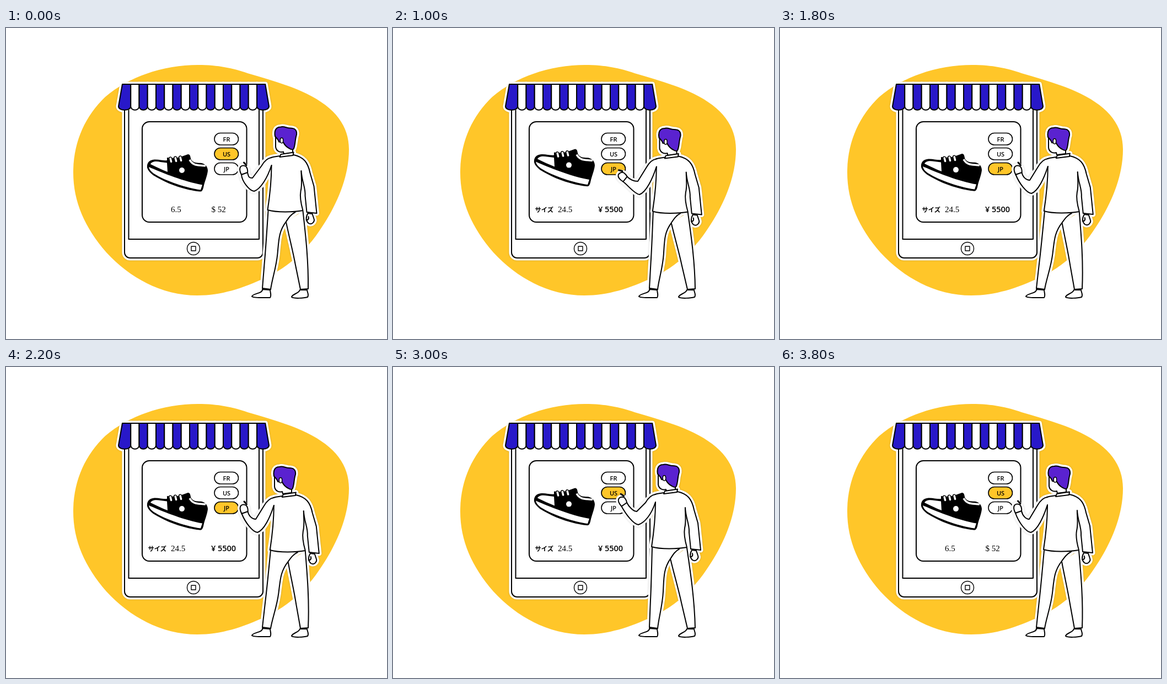
An HTML page for the animation above (4000 ms loop, 691 by 564 pixels).

```html
<!DOCTYPE html>
<html lang="en">
<head>
<meta charset="utf-8">
<title>Shoe shop</title>
<style>
  html, body { margin: 0; width: 100%; height: 100%; overflow: hidden; background: #fff; }
  svg { display: block; width: 691px; height: 564px; }
  .ink { fill: #fff; stroke: #000; stroke-width: 2; stroke-linejoin: round; stroke-linecap: round; }
  .halo { fill: #fff; stroke: #fff; stroke-width: 9; stroke-linejoin: round; stroke-linecap: round;
          filter: drop-shadow(0 0 1.5px rgba(0, 0, 0, .18)); }
  text { fill: #000; stroke: none; }
  .label { font: 600 11px "Open Sans", "Noto Sans", sans-serif; text-anchor: middle; }
  .serif { font: 15px "Liberation Serif", "Times New Roman", serif; }
  .kana { font: 700 11.3px "Noto Sans CJK JP", "Noto Sans CJK", sans-serif; }
  .yen { font: 600 14.5px "Open Sans", "Noto Sans", sans-serif; }
</style>
</head>
<body>
<svg viewBox="0 0 691 564">
  <defs>
    <path id="blob" d="M348 67C385 67 412 73 438 82C475 93 515 104 545 119C598 145 622 178 622 220C622 275 596 330 562 377C535 413 505 437 470 453C430 472 390 485 347 485C285 485 226 455 182 407C143 362 122 315 122 262C122 208 143 160 180 125C225 86 290 67 348 67Z"/>
    <clipPath id="onBlob"><use href="#blob"/></clipPath>
  </defs>
  <use href="#blob" fill="#ffc629"/>

  <g clip-path="url(#onBlob)"><g class="halo"><use href="#stall"/></g></g>
  <g class="ink">
    <g id="stall">
      <rect x="215" y="120" width="251" height="297" rx="10"/>
      <g id="awning"></g>
    </g>
    <path fill="none" d="M222.5 149V383H459V149"/>
    <g stroke-width="1.4">
      <circle cx="340" cy="400" r="11.5"/>
      <rect x="336" y="396" width="8" height="8"/>
    </g>
    <rect x="247" y="170" width="189.5" height="182" rx="13"/>
    <g id="buttons" stroke-width="1.6"></g>
    <g id="us">
      <text class="serif" x="299" y="334">6.5</text>
      <text class="serif" x="372.5" y="334">$ 52</text>
    </g>
    <g id="jp">
      <text class="kana" x="257.5" y="334">サイズ</text>
      <text class="serif" x="299" y="334">24.5</text>
      <text class="yen" x="372" y="334">¥ 5500</text>
    </g>
  </g>

  <g id="shoe" fill="#fff">
    <path d="M256 253C255 245 260 239 269 238.5C278 238 286 241 292 240L292 235C300 236 308 236 316 234L330 229C335 229 334 235 336 239C341 246 348 244 355 245C362 247 366 252 366 259C365 268 361 277 359 285C358 290 357 295 354 296.500C350 297 340 295 330 293C305 287 285 278 267 267C261 262 257 258 256 253Z" fill="#000"/>
    <path d="M262 247C264 242 272 241 280 243L292 244.500L293 261C283 257 272 252 262 247Z"/>
    <path d="M259 252C280 261 320 278 356 284.500L353 293.500C330 291 290 278 268 264C263 260 260 257 259 252Z"/>
    <path fill="none" stroke="#fff" stroke-width="3.500" d="M333 239C340 251 349 248 362 250"/>
    <g id="laces" stroke="#000" stroke-width="1.5"></g>
    <circle cx="319" cy="258" r="5"/>
  </g>

  <g clip-path="url(#onBlob)"><g class="halo"><use href="#man"/></g></g>
  <g class="ink">
    <g id="man">
      <path d="M465 474C466 482 447 481 446 487C450 490 470 489 479 489C482 485 479 479 479 475Z"/>
      <path d="M533 475C531 482 519 482 518 488C522 491 540 490 547 488C550 483 546 479 546 475Z"/>
      <path id="seat" stroke="none"/>
      <path id="leftLeg"/>
      <path id="rightLeg"/>
      <g id="hand">
        <path d="M427 265C424 259 423 253 426 250C430 247 436 249 437 253C439 257 438 260 438 262Z"/>
        <path fill="none" stroke-width="3" d="M436 248L431.500 243"/>
      </g>
      <g id="body">
        <path stroke="none" d="M484 236L525 231L547 262L541 270L485 262Z"/>
        <path d="M551 337C547 344 547 350 552 355C558 359 564 352 562 347L559 338Z"/>
        <path fill="none" d="M548 349C552 350 553 346 552 343"/>
        <path d="M485 250C485 280 482 305 478 331C495 336 525 335 542 332C538 318 536 308 538 297C541 285 539 275 539 260"/>
        <path d="M484 236C490 234 495 234 501 233L525 231C543 235 551 244 555 264L562 288L567 337L549 335L546 305C547 290 540 280 539 260"/>
      </g>
      <path id="arm"/>
      <g id="head">
        <path d="M488 195L488 216C489 223 495 227 502 225L503 229L519 227L519 214Z"/>
        <path fill="#5a22d0" d="M487 197C485 186 489 180 497 180C503 178 508 182 514 182C522 182 527 185 526 194C523 203 524 211 521 219C520 222 516 221 513 219C507 216 504 212 502 208L494 207C493 203 490 200 487 197Z"/>
        <ellipse cx="499" cy="204.500" rx="2.700" ry="4.700" stroke-width="1.5"/>
      </g>
      <path id="collar" d="M502 230L525 226.500L524 232L500 235Z"/>
    </g>
  </g>
</svg>
<script>
const LOOP = 4000, STEP = 200;
const $ = id => document.getElementById(id);

// Offsets from the resting pose; turn of the hand is in degrees.
const pose = (body, head, hand, turn, elbow) => ({ body, head, hand, turn: [turn], elbow });
const rest = pose([0, 0], [0, 0], [0, 0], 0, [0, 0]);
const lean = pose([-3.5, -1], [1, -.5], [0, 1], 0, [-5, -4]);
const tapJP = pose([-7.2, 1.5], [-4.5, 2], [-15, 13], -32, [-8, 2]);
const back = pose([0, 1], [1, 1], [-2, 2], -14, [0, 1]);
const idle = pose([.8, 1], [-1, 1], [.5, 1], 0, [1, 0]);
const ready = pose([-1.5, 0], [-3, 0], [-3, -1], -5, [0, -3]);
const tapUS = pose([-9, -5], [-7, -3], [-15, -13], -15, [-10, -14]);

const timeline = [
  [0, lean], [200, lean], [600, tapJP], [1000, tapJP], [1400, back], [1800, idle],
  [2200, idle], [2600, ready], [3000, tapUS], [3400, tapUS], [3800, rest], [LOOP, lean]
];

function poseAt(t) {
  const i = timeline.findIndex(([end]) => end > t);
  const [start, a] = timeline[i - 1], [end, b] = timeline[i];
  const p = 1 - (1 - (t - start) / (end - start)) ** 2;
  const mixed = {};
  for (const key in a) mixed[key] = a[key].map((v, k) => v + (b[key][k] - v) * p);
  return mixed;
}

function buildStall() {
  const count = 17, width = 15.25, left = 211;
  let stripes = '';
  for (let i = 0; i < count; i++) {
    const x0 = left + i * width, x1 = x0 + width;
    const b0 = i ? x0 : 204, b1 = i < count - 1 ? x1 : 477;
    stripes += `<path fill="${i % 2 ? '#fff' : '#2818c9'}" d="M${x0} 102H${x1}L${b1} 142C${b1} 151 ${b0} 151 ${b0} 142Z"/>`;
  }
  $('awning').innerHTML = stripes;
  $('buttons').innerHTML = ['FR', 'US', 'JP'].map((name, i) => {
    const y = 190.5 + 27 * i;
    return `<rect x="378" y="${y}" width="43.5" height="21.5" rx="10.7"/>
      <text class="label" x="400" y="${y + 15}">${name}</text>`;
  }).join('');
  $('laces').innerHTML = [299, 308, 317].map((x, i) =>
    `<rect x="${x - 2.5}" y="${234 - i}" width="5" height="11" rx="2.5" transform="rotate(-14 ${x} ${240 - i})"/>`
  ).join('');
}

const fist = [431, 256];
const move = (id, [x, y], extra = '') => $(id).setAttribute('transform', `translate(${x} ${y})${extra}`);
const draw = (id, d) => $(id).setAttribute('d', d);
const warp = (d, offset) => d.replace(/([\d.]+),([\d.]+)/g, (_, x, y) => {
  const [dx, dy] = offset(+x, +y);
  return `${+x + dx} ${+y + dy}`;
});

function drawLegs([dx, dy]) {
  const bend = (x, y) => {
    const k = Math.max(0, (472 - y) / 139);
    return [dx * k, dy * k];
  };
  draw('seat', warp('M479,331L542,331L511,354Z', bend));
  draw('leftLeg', warp('M479,333C476,365 473,400 470,425L465,472L480,474C483,455 491,435 494,410C497,385 497,370 511,352C516,345 520,339 528,335', bend));
  draw('rightLeg', warp('M511,353C517,385 522,405 526,430L534,474L548,473C550,425 546,378 542,333', bend));
}

function drawArm({ body, elbow, hand, turn }) {
  const by = offset => (x, y) => `${x + offset[0]} ${y + offset[1]} `;
  const s = by(body), e = by(elbow);
  const angle = turn[0] * Math.PI / 180, cos = Math.cos(angle), sin = Math.sin(angle);
  const w = (x, y) => {
    const dx = x - fist[0], dy = y - fist[1];
    return by(hand)(fist[0] + dx * cos - dy * sin, fist[1] + dx * sin + dy * cos);
  };
  draw('arm', `M${s(485, 236)}C${s(476, 237)}${s(471, 244)}${s(467, 251)}L${e(452, 276)}` +
    `C${e(446, 276)}${w(440, 270)}${w(438, 261)}L${w(427, 265)}` +
    `C${e(433, 282)}${e(446, 299)}${e(455, 300)}C${e(467, 296)}${s(478, 272)}${s(485, 250)}`);
}

function render(time) {
  const t = Math.floor(time % LOOP / STEP) * STEP;
  const p = poseAt(t);
  move('body', p.body);
  move('collar', p.body);
  move('head', p.head);
  move('hand', p.hand, ` rotate(${p.turn[0]} ${fist.join(' ')})`);
  drawLegs(p.body);
  drawArm(p);
  move('shoe', [0, 4.7 * (Math.cos(t / 1000 * Math.PI) - 1)]);

  const jpLit = t >= 600 && t < 3000, jpPrice = t >= 800 && t < 3200;
  const pills = $('buttons').querySelectorAll('rect');
  pills[1].setAttribute('fill', jpLit ? '#fff' : '#ffc629');
  pills[2].setAttribute('fill', jpLit ? '#ffc629' : '#fff');
  $('jp').setAttribute('visibility', jpPrice ? 'visible' : 'hidden');
  $('us').setAttribute('visibility', jpPrice ? 'hidden' : 'visible');
}

buildStall();
const began = performance.now();
function tick() {
  render(performance.now() - began);
  requestAnimationFrame(tick);
}
tick();
</script>
</body>
</html>
```
